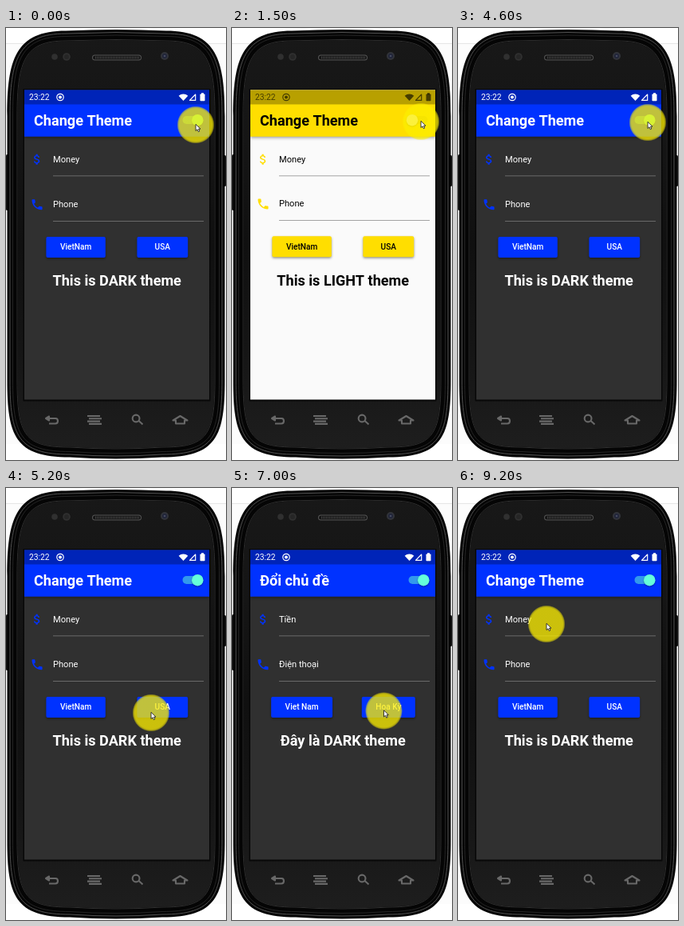
An HTML page with a canvas for the animation above (9400 ms loop, 276 by 540 pixels).

```html
<!DOCTYPE html>
<html lang="en">
<head>
<meta charset="utf-8">
<title>Change Theme</title>
<style>
  html, body { margin: 0; width: 100%; height: 100%; overflow: hidden; background: #fff; }
  canvas { display: block; width: 276px; height: 540px; }
</style>
</head>
<body>
<canvas id="stage"></canvas>
<script>
const W = 276, H = 540, LOOP = 9400, STEP = 100;
const canvas = document.getElementById('stage');
const ratio = window.devicePixelRatio || 1;
canvas.width = W * ratio;
canvas.height = H * ratio;
const ctx = canvas.getContext('2d');
const TAU = Math.PI * 2;

const LIGHT = { bg: [250, 250, 250], main: [255, 222, 0], text: [0, 0, 0], line: [134, 134, 134] };
const DARK = { bg: [48, 48, 48], main: [0, 50, 255], text: [255, 255, 255], line: [124, 124, 124] };
const ENGLISH = { title: 'Change Theme', money: 'Money', phone: 'Phone', left: 'VietNam', right: 'USA', intro: 'This is' };
const VIETNAMESE = { title: 'Đổi chủ đề', money: 'Tiền', phone: 'Điện thoại', left: 'Viet Nam', right: 'Hoa Kỳ', intro: 'Đây là' };

// Pointer path: time, x, y
const POINTER = [
  [0, 238, 121], [300, 238, 121], [400, 239, 113], [500, 237, 117], [4500, 237, 117],
  [4600, 238, 118], [4800, 241, 165], [5100, 196, 295], [5200, 182, 281], [5500, 182, 281],
  [5700, 110, 280], [5800, 113, 279], [6400, 113, 279], [7100, 195, 278.5],
  [8300, 195, 278.5], [9200, 111, 170], [LOOP, 111, 170]
];

const MONEY_ICON = new Path2D('M11.8 10.9c-2.27-.59-3-1.2-3-2.15 0-1.09 1.01-1.85 2.7-1.85 1.78 0 2.44.85 2.5 2.1h2.21c-.07-1.72-1.12-3.3-3.21-3.81V3h-3v2.16c-1.94.42-3.5 1.68-3.5 3.61 0 2.31 1.91 3.46 4.7 4.13 2.5.6 3 1.48 3 2.41 0 .69-.49 1.79-2.7 1.79-2.06 0-2.87-.92-2.98-2.1h-2.2c.12 2.19 1.76 3.42 3.68 3.83V21h3v-2.15c1.95-.37 3.5-1.5 3.5-3.55 0-2.84-2.43-3.81-4.7-4.4z');
const PHONE_ICON = new Path2D('M6.62 10.79c1.44 2.83 3.76 5.14 6.59 6.59l2.2-2.2c.27-.27.67-.36 1.02-.24 1.12.37 2.33.57 3.57.57.55 0 1 .45 1 1V20c0 .55-.45 1-1 1-9.39 0-17-7.61-17-17 0-.55.45-1 1-1h3.5c.55 0 1 .45 1 1 0 1.25.2 2.45.57 3.57.11.35.03.74-.25 1.02l-2.2 2.2z');
const ARROW = new Path2D('M0 0V8.2L2 6.5L3.3 9.4L4.8 8.7L3.5 5.9H6Z');
const SOFT_KEYS = new Path2D('M54 494.5H62Q65 494.5 65 491.3Q65 488 62 488H50M54 485.5L50 488L54 490.5Z' +
  'M102 485H118M104 488.3H120M102 491.6H118M104 494.9H120' +
  'M167.5 488A4.4 4.4 0 1 1 158.7 488A4.4 4.4 0 1 1 167.5 488M166.8 491.3L171.5 495.5' +
  'M209.5 490.5L218.5 485L227.5 490.5H224V494.5H213V490.5Z');

const clamp = v => Math.max(0, Math.min(1, v));
const ease = v => v * v * (3 - 2 * v);
const mix = (a, b, k) => a + (b - a) * k;
const rgb = c => `rgb(${c.map(Math.round)})`;
const blend = (key, k) => rgb(LIGHT[key].map((v, i) => mix(v, DARK[key][i], k)));

function box(x, y, w, h, fill, r = 0) {
  ctx.beginPath();
  ctx.roundRect(x, y, w, h, r);
  ctx.fillStyle = fill;
  ctx.fill();
}

function disc(x, y, r, fill) {
  ctx.beginPath();
  ctx.arc(x, y, r, 0, TAU);
  ctx.fillStyle = fill;
  ctx.fill();
}

function text(str, x, y, size, weight, fill, align = 'left') {
  ctx.font = `${weight} ${size}px Roboto, sans-serif`;
  ctx.textAlign = align;
  ctx.fillStyle = fill;
  ctx.fillText(str, x, y);
}

function withShadow(blur, dy, alpha, paint) {
  ctx.save();
  ctx.shadowColor = `rgba(0,0,0,${alpha})`;
  ctx.shadowBlur = blur * ratio;
  ctx.shadowOffsetY = dy * ratio;
  paint();
  ctx.restore();
}

function icon(path, x, y, fill) {
  ctx.save();
  ctx.translate(x, y);
  ctx.scale(0.725, 0.725);
  ctx.fillStyle = fill;
  ctx.fill(path);
  ctx.restore();
}

function verticalFade(y0, y1, ...colors) {
  const g = ctx.createLinearGradient(0, y0, 0, y1);
  colors.forEach((c, i) => g.addColorStop(i / (colors.length - 1), c));
  return g;
}

function shell(inset) {
  const l = 1.5 + inset, r = 274.5 - inset, t = 3.5 + inset, b = 536.5 - inset;
  ctx.beginPath();
  ctx.moveTo(l, 110);
  ctx.bezierCurveTo(l, 40, l + 10, t, 75, t);
  ctx.quadraticCurveTo(138, t - 3, 201, t);
  ctx.bezierCurveTo(r - 10, t, r, 40, r, 110);
  ctx.lineTo(r, 440);
  ctx.bezierCurveTo(r, 510, r - 10, b, 196, b);
  ctx.quadraticCurveTo(138, b + 4, 80, b);
  ctx.bezierCurveTo(l + 10, b, l, 510, l, 440);
  ctx.closePath();
}

function drawPhone() {
  box(0, 0, W, H, '#fff');
  box(0, 19, W, 1, '#e6e6e6');
  box(0, 20, W, 500, '#fcfcfc');
  box(0, 158, 6, 70, '#111', 1.5);
  box(270, 159, 6, 39, '#111', 1.5);

  shell(0);
  ctx.fillStyle = '#050505';
  ctx.fill();
  [[3.5, '#5a5a5a', 0.9], [7, '#2c2c2c', 0.8], [12.5, '#303030', 1]].forEach(([inset, color, width]) => {
    shell(inset);
    ctx.strokeStyle = color;
    ctx.lineWidth = width;
    ctx.stroke();
  });
  shell(13);
  ctx.fillStyle = verticalFade(10, 530, '#181818', '#151515', '#101010', '#151515', '#1e1e1e');
  ctx.fill();

  disc(61, 36, 3.8, '#303030');
  disc(76, 36, 4.8, '#303030');
  disc(76, 36, 3, '#262626');
  disc(199, 35, 5, '#32343a');
  disc(199, 35, 3, '#20253a');
  disc(199, 35, 1.3, '#454a60');
  box(108, 33.5, 62, 7, '#555', 3.5);
  box(109, 34.5, 60, 5, '#151515', 2.5);
  for (let x = 112; x < 167; x += 2) box(x, 35.5, 1, 3, '#444');

  ctx.strokeStyle = '#686868';
  ctx.lineWidth = 2.1;
  ctx.lineJoin = 'round';
  ctx.stroke(SOFT_KEYS);
  box(21.5, 76, 235, 390.5, '#080808');
}

function drawStatus(dark) {
  const ink = dark > 0.5 ? '#fff' : 'rgba(0,0,0,.62)';
  box(23, 77.5, 232, 18, 'rgba(0,0,0,.28)');
  text('23:22', 29, 90.2, 10.3, 400, ink);
  ctx.strokeStyle = ink;
  ctx.lineWidth = 1.2;
  ctx.beginPath();
  ctx.arc(68, 86.5, 4.2, 0, TAU);
  ctx.stroke();
  disc(68, 86.5, 2, ink);

  ctx.fillStyle = ink;
  ctx.beginPath();
  ctx.moveTo(222.5, 91);
  ctx.arc(222.5, 91, 8.5, -Math.PI * 0.74, -Math.PI * 0.26);
  ctx.closePath();
  ctx.fill();
  ctx.beginPath();
  ctx.moveTo(230.5, 90.4);
  ctx.lineTo(237.7, 90.4);
  ctx.lineTo(237.7, 83);
  ctx.closePath();
  ctx.stroke();
  box(243.5, 82.5, 6, 8.8, ink, 0.8);
  box(245, 81.3, 3, 2, ink);
}

function drawSwitch(dark) {
  const mint = a => `rgba(100,255,218,${a})`;
  ctx.globalAlpha = 1 - dark;
  box(221.5, 110, 24, 10, 'rgba(0,0,0,.1)', 5);
  ctx.globalAlpha = dark;
  box(221.5, 110, 24, 10, mint(0.5), 5);
  ctx.globalAlpha = 1;
  const thumb = LIGHT.bg.map((v, i) => mix(v, [100, 255, 218][i], dark));
  withShadow(2, 1, 0.35, () => disc(mix(226, 240.3, ease(dark)), 115.2, 7.25, rgb(thumb)));
}

function drawButton(label, center, y, dark, press) {
  ctx.font = '500 10.15px Roboto, sans-serif';
  const width = Math.max(63.8, ctx.measureText(label).width + 35);
  const x = center - width / 2;
  withShadow(3, 1.5, 0.42, () => box(x, y, width, 26, blend('main', dark), 2));
  if (press) box(x, y, width, 26, `rgba(255,255,255,${press})`, 2);
  text(label, center, y + 16.4, 10.15, 500, blend('text', dark), 'center');
}

function drawField(label, path, y, dark, labelDark) {
  icon(path, 30.3, y - 8.7, blend('main', dark));
  text(label, 59, y + 3.3, 11.1, 400, blend('text', labelDark));
  box(59, y + 20.2, 189, 0.9, blend('line', dark));
}

function drawApp(t) {
  const fadeAt = delay => t < 2500 ? 1 - clamp((t - 1110 - delay) / 200) : clamp((t - 3010 - delay) / 200);
  const dark = fadeAt(0), labelDark = fadeAt(100);
  const name = t >= 1100 && t < 3000 ? 'LIGHT' : 'DARK';
  const words = t >= 6100 && t < 7700 ? VIETNAMESE : ENGLISH;
  const pressAt = start => t >= start && t < start + 300 ? 0.12 * (1 - (t - start) / 300) : 0;
  const shift = -0.7 * (1 - dark);

  ctx.save();
  ctx.beginPath();
  ctx.rect(23, 77.5, 232, 387);
  ctx.clip();
  box(23, 77, 232, 388, blend('bg', dark));
  withShadow(4, 1.5, 0.4, () => box(23, 77, 232, 58.8, blend('main', dark)));
  drawStatus(dark);
  text(words.title, 35, 122, 18.1, 700, blend('text', dark));
  drawSwitch(dark);
  drawField(words.money, MONEY_ICON, 164.2, dark, labelDark);
  drawField(words.phone, PHONE_ICON, 220.7 + shift, dark, labelDark);
  drawButton(words.left, 87.6, 261 + shift, dark, pressAt(6000));
  drawButton(words.right, 196.3, 261 + shift, dark, pressAt(7600));
  text(`${words.intro} ${name} theme`, 139.2, 322.3 + shift, 18.1, 700, blend('text', dark), 'center');
  ctx.restore();
}

function drawPointer(t) {
  const i = POINTER.findIndex(p => p[0] > t);
  const [t0, x0, y0] = POINTER[i - 1], [t1, x1, y1] = POINTER[i];
  const k = ease((t - t0) / (t1 - t0));
  const x = mix(x0, x1, k), y = mix(y0, y1, k);
  const glow = ctx.createRadialGradient(x, y, 0, x, y, 23.5);
  [[0, 0.76], [0.87, 0.76], [0.94, 0.55], [1, 0]].forEach(([at, a]) => glow.addColorStop(at, `rgba(252,238,0,${a})`));
  disc(x, y, 23.5, glow);

  ctx.save();
  ctx.translate(x, y - 0.7);
  ctx.lineWidth = 0.9;
  ctx.strokeStyle = '#222';
  ctx.fillStyle = '#fff';
  ctx.fill(ARROW);
  ctx.stroke(ARROW);
  ctx.restore();
}

let start;
function frame(now) {
  start ??= now;
  const t = Math.floor(((now - start) % LOOP) / STEP) * STEP;
  ctx.setTransform(ratio, 0, 0, ratio, 0, 0);
  drawPhone();
  drawApp(t);
  drawPointer(t);
  requestAnimationFrame(frame);
}
requestAnimationFrame(frame);
</script>
</body>
</html>
```
